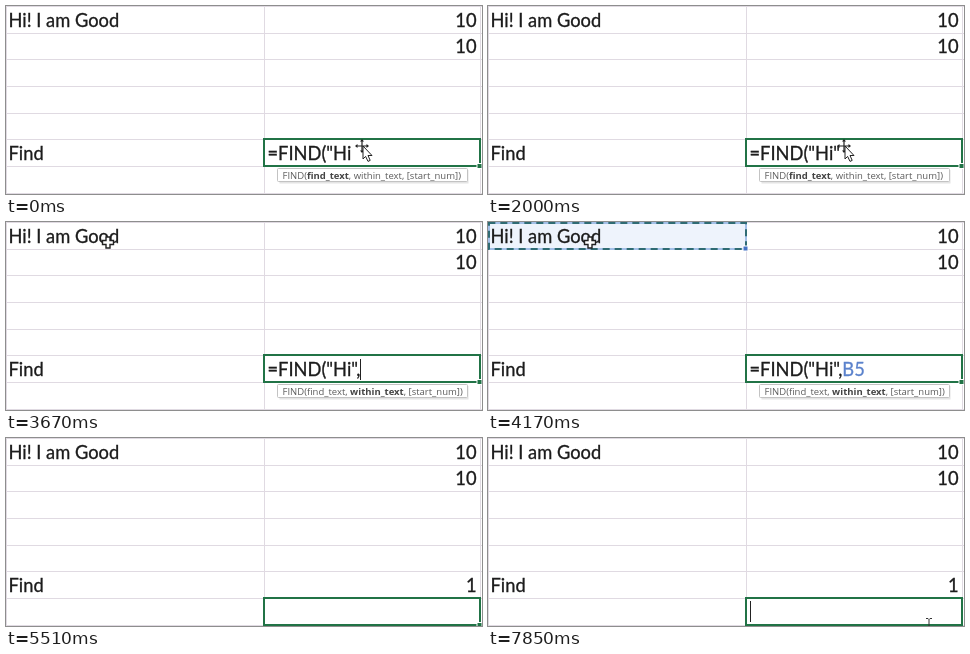
An HTML page that plays this animation: 476x188 px, repeating every 8 s.

```html
<!DOCTYPE html>
<html lang="en">
<head>
<meta charset="utf-8">
<style>
  html, body { margin: 0; width: 100%; height: 100%; overflow: hidden; background: #fff; }
  svg { display: block; width: 476px; height: 188px; }
  .sheet { font: 18.3px Lato, sans-serif; fill: #1c1c1c; stroke: #1c1c1c; stroke-width: .3; }
  .sheet .ref { fill: #5b82cc; stroke: #5b82cc; }
  .sheet .match { font-weight: 900; }
  .num { text-anchor: end; }
  .hint { font: 9.5px "Open Sans", sans-serif; fill: #5c5c5c; }
  .hint tspan { fill: #444; }
  .grid { stroke: #e0dae2; fill: none; }
  .active { stroke: #217346; stroke-width: 2; fill: #fff; }
  .pointer path { stroke-linejoin: round; }
</style>
</head>
<body>
<svg viewBox="0 0 476 188">
  <path class="grid" d="M0 .5H476M0 27.5H476M0 53.5H476M0 80.5H476M0 107.5H476M0 133.5H476M0 160.5H476M0 187.5H476M.5 0V188M258.5 0V188M474.5 0V188"/>

  <g id="reference">
    <rect x="1" y="1" width="257" height="26" fill="#eef3fc" stroke="#a3bfe8" stroke-width="2"/>
    <rect id="ants" x="1" y="1" width="257" height="26" fill="none" stroke="#2f6b73" stroke-width="2" stroke-dasharray="7 5"/>
    <path d="M255 24h5v5h-5z" fill="#4472c4" stroke="#fff"/>
  </g>

  <g class="sheet">
    <text x="2.5" y="21">Hi! I am Good</text>
    <text class="num" x="470.5" y="21">10</text>
    <text class="num" x="470.5" y="47">10</text>
    <text x="2.5" y="154">Find</text>
    <text class="num" id="result" x="470.5" y="154">1</text>
  </g>

  <g id="selection">
    <rect class="active" x="258" width="216" height="27"/>
    <path id="handle" d="M471 24.5h5v5h-5z" fill="#217346" stroke="#fff"/>
  </g>
  <text class="sheet" id="formula" x="261.5" y="154"></text>
  <path id="caret" stroke="#222" fill="none"/>

  <g id="tooltip">
    <rect x="273.5" y="164" width="189" height="13.5" fill="#e4e4e4"/>
    <rect x="271.5" y="162.5" width="190" height="13" rx="1" fill="#fff" stroke="#c3c3c3"/>
    <text class="hint" id="hint" x="276.5" y="172.5"></text>
  </g>

  <g class="pointer" id="move">
    <path d="M-6 0H6M0 -6V6" stroke="#222" stroke-width="1.2"/>
    <path d="M-7 0l2.5-2v4zM7 0l-2.5-2v4zM0-7l-2 2.5h4zM0 7l-2-2.5h4z" fill="#222"/>
    <path d="M1 0V13l2.6-2.6 2.4 5 2.2-1L6 9.5h4z" fill="#fff" stroke="#222"/>
  </g>
  <path class="pointer" id="cross" d="M-2-5.5h4v3.5h3.5v4h-3.5v3.5h-4v-3.5h-3.5v-4h3.5z" fill="#fff" stroke="#222" stroke-width="1.4"/>
  <path class="pointer" id="beam" d="M-3-3.5h2l1 1 1-1h2M0-2.5V3.5M-3 4.5h2l1-1 1 1h2" fill="none" stroke="#333"/>
</svg>

<script>
const LOOP = 8000, STEP = 1000 / 6;
const QUOTE = 1170, COMMA = 2330, TRAVEL = 2660, ARRIVE = 3490;
const PICK = 4160, CLOSE = 4660, ENTER = 5330, RETURN = 7340, EDIT = 7670;

const $ = id => document.getElementById(id);
const show = (id, on) => $(id).style.display = on ? '' : 'none';
const between = (t, a, b) => t >= a && t < b;
const ease = p => p * p * (3 - 2 * p);
const progress = (t, a, b) => ease(Math.min(1, Math.max(0, (t - a) / (b - a))));

function place(id, on, x, y) {
  show(id, on);
  $(id).setAttribute('transform', `translate(${x} ${y})`);
}

function setMarkup(id, markup) {
  if ($(id).dataset.markup === markup) return;
  $(id).dataset.markup = markup;
  $(id).innerHTML = markup;
}

function formulaAt(t) {
  if (t >= ENTER) return '';
  const paren = s => between(t, CLOSE, CLOSE + 500) ? `<tspan class="match">${s}</tspan>` : s;
  return '=FIND' + paren('(') + '"Hi'
    + (t >= QUOTE ? '"' : '')
    + (t >= COMMA ? ',' : '')
    + (t >= PICK ? '<tspan class="ref">B5</tspan>' : '')
    + (t >= CLOSE ? paren(')') : '');
}

function hintAt(t) {
  const args = ['find_text', 'within_text', '[start_num]'];
  const current = t < COMMA ? 0 : 1;
  return 'FIND(' + args.map((a, i) =>
    i === current ? `<tspan font-weight="bold">${a}</tspan>` : a).join(', ') + ')';
}

function drawCaret(t, entered) {
  const blinkOn = between(t, COMMA, COMMA + 400) || between(t, 3490, 4000);
  const editing = t >= EDIT;
  show('caret', editing || (!entered && blinkOn));
  const x = editing ? 262.5 : Math.round(261.5 + $('formula').getComputedTextLength()) + .5;
  $('caret').setAttribute('d', `M${x} ${editing ? 163 : 137}v21`);
}

function drawPointer(t) {
  const p = progress(t, TRAVEL, ARRIVE);
  const back = progress(t, RETURN, EDIT);
  place('move', t < TRAVEL, 356, 140);
  if (t < ENTER) place('cross', between(t, TRAVEL, CLOSE), 357 - 255 * p, 145 - 124.5 * p);
  else place('cross', between(t, RETURN, EDIT), 455 - 14 * back, 186 - 2 * back);
  place('beam', t >= EDIT, 441, 184);
}

function render(time) {
  const t = Math.floor((time + 8) / STEP) * STEP;
  const entered = t >= ENTER;
  setMarkup('formula', formulaAt(t));
  setMarkup('hint', hintAt(t));
  show('result', entered);
  show('tooltip', !entered);
  show('reference', between(t, PICK, ENTER));
  $('ants').setAttribute('stroke-dashoffset', -t / 50);
  place('selection', true, 0, entered ? 160 : 133);
  show('handle', t < EDIT);
  drawCaret(t, entered);
  drawPointer(t);
}

const start = performance.now();
function tick() {
  render((performance.now() - start) % LOOP);
  requestAnimationFrame(tick);
}
tick();
</script>
</body>
</html>
```
